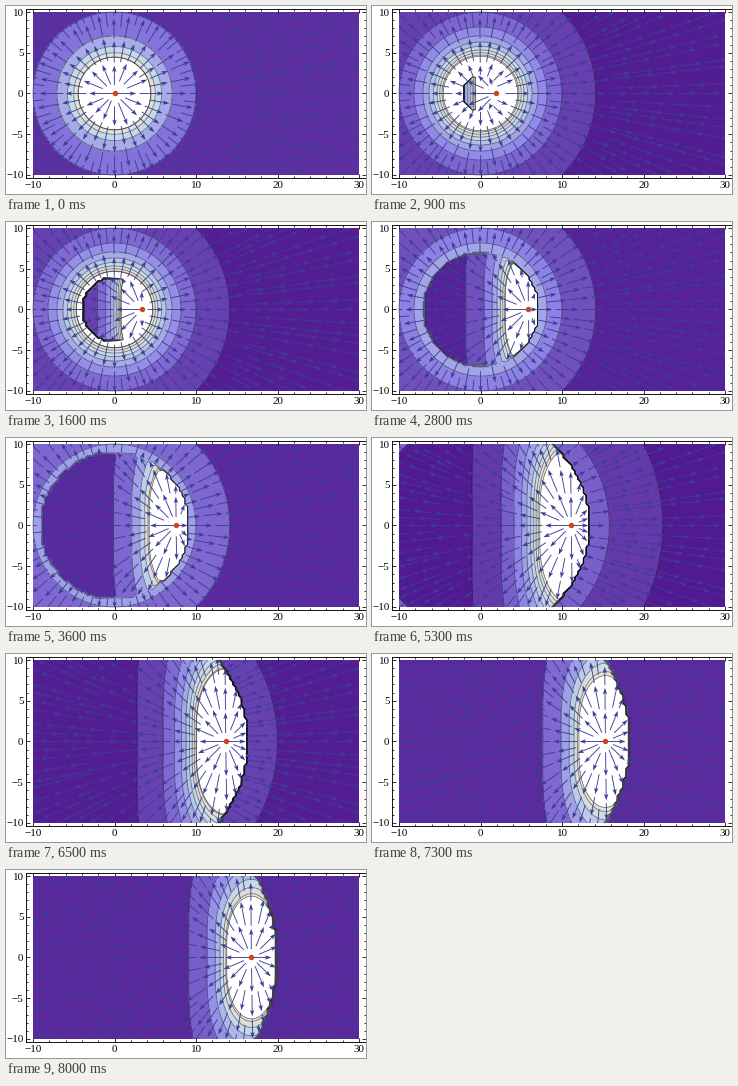
A matplotlib script that plays this animation: 360 px wide and 188 px high, repeating every 8.1 s.

```python
import numpy as np
import matplotlib.pyplot as plt
from matplotlib.animation import FuncAnimation
from matplotlib.collections import LineCollection, PolyCollection
from matplotlib.colors import LinearSegmentedColormap
from matplotlib.patches import Rectangle
from matplotlib.ticker import MultipleLocator

W, H, DPI = 360, 188, 100
SCALE, X0, Y0 = 8.15, 108.5, 87.5      # pixels per unit and pixel of the origin
PX = 72 / DPI
SPEED = 0.84                           # in units of the wave speed
FRAMES, DT = 81, 0.25
ARROW = (0.24, 0.24, 0.6)
LAKE = LinearSegmentedColormap.from_list("lake", [
    (0.293, 0.057, 0.529), (0.564, 0.528, 0.909),
    (0.763, 0.847, 0.914), (0.941, 0.907, 0.834)])

plt.rcParams["font.family"] = "Liberation Serif"
fig = plt.figure(figsize=(W / DPI, H / DPI), dpi=DPI, facecolor="white")
ax = fig.add_axes([(X0 - 10.8 * SCALE) / W, 1 - (Y0 + 10.4 * SCALE) / H,
                   41.6 * SCALE / W, 20.8 * SCALE / H])
ax.set(xlim=(-10.8, 30.8), ylim=(-10.4, 10.4))
ax.xaxis.set_major_locator(MultipleLocator(10))
ax.xaxis.set_minor_locator(MultipleLocator(2))
ax.yaxis.set_major_locator(MultipleLocator(5))
ax.yaxis.set_minor_locator(MultipleLocator(1))
ax.tick_params(which="both", direction="in", top=True, right=True, width=0.8 * PX)
ax.tick_params(which="major", length=4 * PX, labelsize=11 * PX, pad=3 * PX)
ax.tick_params(which="minor", length=2.4 * PX)
for spine in ax.spines.values():
    spine.set_linewidth(0.9 * PX)
window = Rectangle((-10, -10), 40, 20, transform=ax.transData)

gx, gy = np.meshgrid(np.linspace(-10, 30, 121), np.linspace(-10, 10, 61))


def make_streams(seed, count=128):
    """Radial dashes (start, end, angle); extra rays join further out."""
    rng = np.random.default_rng(seed)
    dashes = []
    for i in range(count):
        if i % 8 == 0:
            start = 0.9
        elif i % 4 == 0:
            start = 3.6
        elif i % 2 == 0:
            start = 8
        else:
            start = 16
        angle = 2 * np.pi * i / count
        if i % 64:
            angle += rng.uniform(-0.3, 0.3) * 2 * np.pi / count
            start += rng.uniform(0, 0.8)
        else:
            start = 0.2
        while start < 34:
            length = rng.uniform(2.2, 3.0)
            dashes.append((start, start + length, angle))
            start += length + 0.35
    return np.array(dashes).T


INNER, OUTER = make_streams(3), make_streams(8)


def field(t):
    """Coulomb field outside the wavefront, moving-charge field inside."""
    r2 = np.maximum((gx - SPEED * t)**2 + gy**2, 0.01)
    moving = (1 - SPEED**2) * np.sqrt(r2) / (r2 - (SPEED * gy)**2)**1.5
    dist2 = gx**2 + gy**2
    return np.where(dist2 < t * t, moving, 1 / np.maximum(dist2, 0.01))


def contour_levels(t):
    top = np.interp(t, [0, 4, 7, 10.5, 13.5, 16.25, 20],
                    [0.0508, 0.046, 0.037, 0.0199, 0.0199, 0.0232, 0.0325])
    steps = [0.002, 0.0025, 0.005, 0.01]
    step = next((s for s in steps if top / s <= 10), steps[-1])
    return np.append(np.arange(step, top - 0.05 * step, step), top)


def dashes_at(t):
    """Origins and clipped dashes on both sides of the wavefront."""
    r0, r1, a = OUTER
    parts = [(np.zeros_like(a), np.maximum(r0, t), r1, a)]
    if t > 0:
        r0, r1, a = INNER
        c = SPEED * t
        exit_r = -c * np.cos(a) + np.sqrt(t * t - (c * np.sin(a))**2)
        parts.append((np.full_like(a, c), r0, np.minimum(r1, exit_r), a))
    x, r0, r1, a = np.hstack([np.array(p) for p in parts])
    keep = r1 - r0 > 0.6
    return x[keep], r0[keep], r1[keep], a[keep]


def arrows(t):
    x, r0, r1, a = dashes_at(t)

    def point(r, side=0.0):
        return np.column_stack([x + r * np.cos(a) - side * np.sin(a),
                                r * np.sin(a) + side * np.cos(a)])

    shafts = np.stack([point(r0), point(r1 - 0.4)], axis=1)
    heads = np.stack([point(r1), point(r1 - 0.8, 0.27),
                      point(r1 - 0.62), point(r1 - 0.8, -0.27)], axis=1)
    return (LineCollection(shafts, colors=[ARROW], linewidths=0.9 * PX, zorder=1.6),
            PolyCollection(heads, facecolors=[ARROW], edgecolors="none", zorder=1.6))


dot, = ax.plot([0], [0], "o", color=(0.8, 0.27, 0.1), ms=5.4 * PX, mew=0, zorder=1.8)
drawn = []


def update(frame):
    t = frame * DT
    while drawn:
        drawn.pop().remove()
    z = field(t)
    levels = contour_levels(t)
    low, top = z.min(), levels[-1]
    edges = np.insert(levels, 0, low)
    mids = (edges[:-1] + edges[1:]) / 2
    colors = LAKE((mids - low) / (top - low))
    bounds = np.insert(levels, 0, 0)
    drawn.append(ax.contourf(gx, gy, z, bounds, colors=colors, zorder=1))
    drawn.append(ax.contour(gx, gy, z, levels, colors=[(0, 0, 0, 0.5)],
                            linewidths=0.8 * PX, zorder=1.2))
    for artist in arrows(t):
        ax.add_collection(artist, autolim=False)
        artist.set_clip_path(window)
        drawn.append(artist)
    ax.set(xlim=(-10.8, 30.8), ylim=(-10.4, 10.4))
    dot.set_data([SPEED * t], [0])
    return [dot]


anim = FuncAnimation(fig, update, frames=FRAMES, interval=100,
                     init_func=lambda: [dot], repeat=True, repeat_delay=0, blit=False)
plt.show()
```
